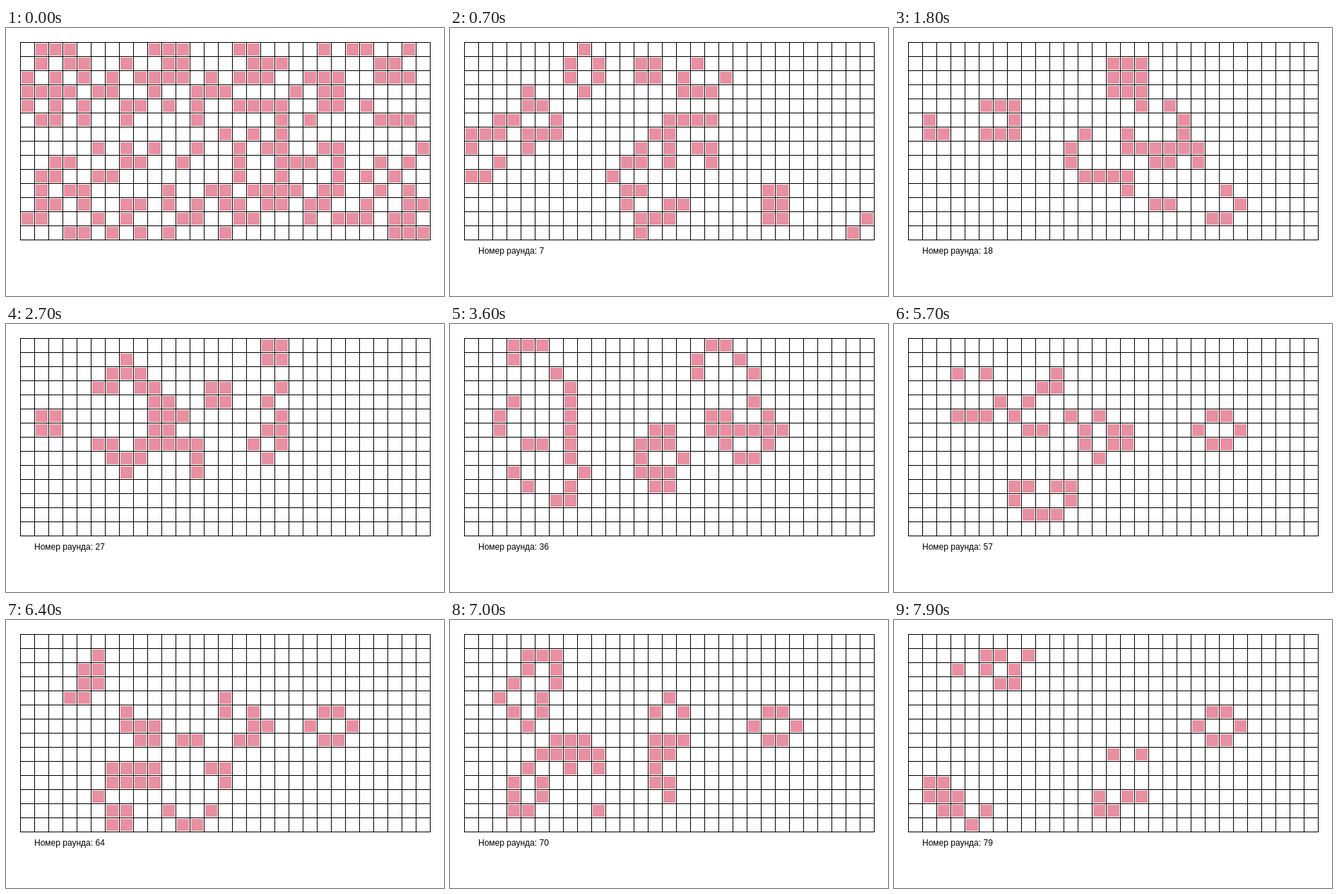
Write an HTML page with a canvas that moves like this. It is 620x380 px and loops after 8000 ms.

```html
<!DOCTYPE html>
<html lang="ru">
<head>
<meta charset="utf-8">
<title>Игра «Жизнь»</title>
<style>
  html, body { margin: 0; width: 620px; height: 380px; overflow: hidden; background: #fff; }
  canvas { display: block; }
</style>
</head>
<body>
<canvas id="stage" width="620" height="380"></canvas>
<script>
const COLS = 29, ROWS = 14, SIZE = 20, LEFT = 20, TOP = 20;
const STEP = 100, ROUNDS = 80;

// Starting colony, one line per row
const seed = [
  '.###.....###...##....#.##..#.',
  '.#.##..#..##....###......##..',
  '#.#.#.#.####.#.###..###..###.',
  '####.##..#..###....#.##......',
  '#.#.#..##.#.#..####..##.#....',
  '.##.#..#....#.....#.#....###.',
  '..............#.#.#..........',
  '.....#.#.#..#..#.##..##.....#',
  '..##...##..#...#..###.#..#.#.',
  '.##..##........#..#...#.#.#..',
  '.#.##.....#..##.####.##..#.#.',
  '.##.#..##.#.#.##.##.##..#..##',
  '##...#.#...##..##...#.###.##.',
  '...##.#.#.#...#...........###'
].map(row => Array.from(row, ch => ch === '#' ? 1 : 0));

// Cells outside the field count as dead
function neighbours(grid, r, c) {
  let sum = -grid[r][c];
  for (let y = Math.max(r - 1, 0); y <= Math.min(r + 1, ROWS - 1); y++)
    for (let x = Math.max(c - 1, 0); x <= Math.min(c + 1, COLS - 1); x++)
      sum += grid[y][x];
  return sum;
}

function evolve(grid) {
  return grid.map((row, r) => row.map((alive, c) => {
    const n = neighbours(grid, r, c);
    return n === 3 || (alive && n === 2) ? 1 : 0;
  }));
}

const history = [seed];
while (history.length < ROUNDS) history.push(evolve(history[history.length - 1]));

const ctx = document.getElementById('stage').getContext('2d');

function drawGrid() {
  ctx.fillStyle = '#000';
  for (let c = 0; c <= COLS; c++) ctx.fillRect(LEFT + c * SIZE, TOP, 1, ROWS * SIZE + 1);
  for (let r = 0; r <= ROWS; r++) ctx.fillRect(LEFT, TOP + r * SIZE, COLS * SIZE + 1, 1);
}

function drawCells(grid) {
  ctx.fillStyle = '#e890a2';
  grid.forEach((row, r) => row.forEach((alive, c) => {
    if (alive) ctx.fillRect(LEFT + c * SIZE + 2, TOP + r * SIZE + 2, SIZE - 3, SIZE - 3);
  }));
}

function drawLabel(round) {
  ctx.fillStyle = '#000';
  ctx.font = '12px "Liberation Sans", Arial, sans-serif';
  ctx.fillText('Номер раунда: ' + round, 40, 320);
}

function draw(round) {
  ctx.fillStyle = '#fff';
  ctx.fillRect(0, 0, 620, 380);
  drawGrid();
  drawCells(history[round]);
  if (round > 0) drawLabel(round);
}

const start = performance.now();
function tick(now) {
  draw(Math.floor(Math.max(0, now - start) / STEP) % ROUNDS);
  requestAnimationFrame(tick);
}
draw(0);
requestAnimationFrame(tick);
</script>
</body>
</html>
```
